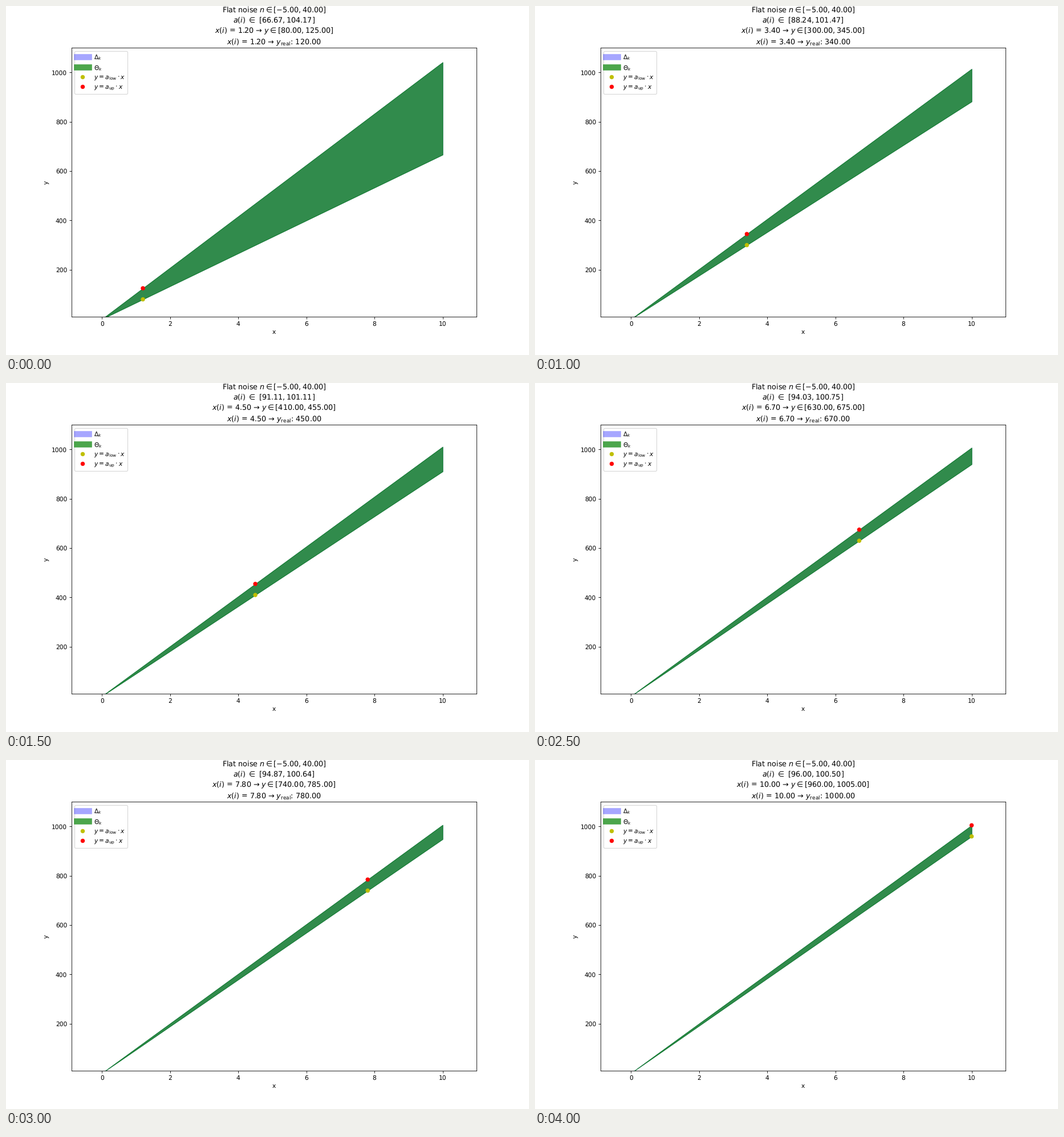
Animation of 917x611 px, one loop 4500 ms. Source, as a matplotlib script:

```python
import numpy as np
import matplotlib.pyplot as plt
from matplotlib.animation import FuncAnimation
from matplotlib.lines import Line2D

plt.rcParams["text.hinting"] = "none"

W, H, DPI = 917, 611, 76.4
SLOPE = 100
N_LOW, N_UP = -5, 40
STEPS = np.linspace(1.2, 10, 9)
X_END = 10
LAYERS = [("blue", 0.35), ("green", 0.7)]
DOT_COLORS = ["y", "r"]

fig, ax = plt.subplots(figsize=((W + 1e-6) / DPI, (H + 1e-6) / DPI), dpi=DPI)

wedges = [ax.fill_between([0, X_END], 0, [0, 1], color=c, alpha=a, lw=1)
          for c, a in LAYERS]
dots = ax.scatter([0, 0], [0, 0], s=36, c=DOT_COLORS, linewidths=1, zorder=2)
ax.set(xlim=(-0.9, 11), ylim=(10, 1100), xlabel="x", ylabel="y")

keys = [Line2D([], [], color=c, alpha=a, lw=10) for c, a in LAYERS]
keys += [Line2D([], [], color=c, marker="o", ls="") for c in DOT_COLORS]
ax.legend(keys,
          [r"$\Delta_k$", r"$\Theta_k$",
           r"$y=a_{\mathrm{low}} \cdot x$", r"$y=a_{\mathrm{up}} \cdot x$"],
          loc="upper left", labelspacing=0.43, borderpad=0.36,
          handletextpad=0.84)


def interval(lo, hi):
    return f"[{lo:.2f}, {hi:.2f}]"


def update(i):
    x = STEPS[i]
    y = SLOPE * x
    y_low, y_up = y - N_UP, y - N_LOW
    a_low, a_up = y_low / x, y_up / x

    for wedge in wedges:
        wedge.set_verts([[(0, 0), (X_END, a_low * X_END),
                          (X_END, a_up * X_END)]])
    dots.set_offsets([(x, y_low), (x, y_up)])

    ax.set_title("\n".join([
        rf"Flat noise $n \in {interval(N_LOW, N_UP)}$",
        rf"$a(i)$ $\in$ ${interval(a_low, a_up)}$",
        rf"$x(i)$ = {x:.2f} → $y \in {interval(y_low, y_up)}$",
        rf"$x(i)$ = {x:.2f} → $y_{{\mathrm{{real}}}}$: {y:.2f}",
    ]), linespacing=1.23)
    return [*wedges, dots, ax.title]


anim = FuncAnimation(fig, update, frames=len(STEPS), interval=500,
                     repeat=True, repeat_delay=0, blit=False)
plt.show()
```
